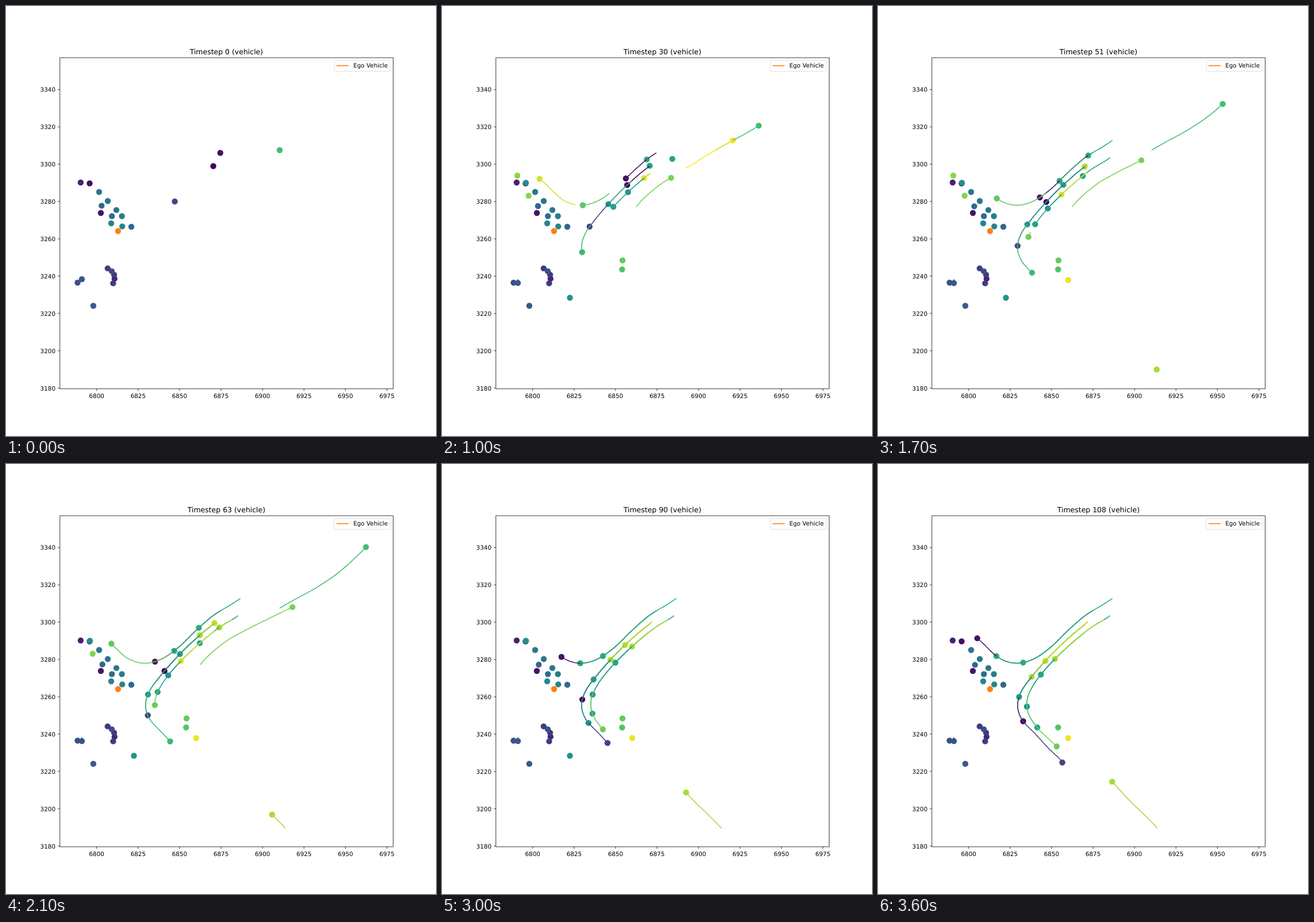
Recreate the animation shown at these times as an HTML page with a canvas. Size 748x748 px, loop 3700 ms.

```html
<!DOCTYPE html>
<html>
<head>
<meta charset="utf-8">
<style>
html, body { margin: 0; width: 100%; height: 100%; overflow: hidden; background: #fff; }
canvas { display: block; }
</style>
</head>
<body>
<canvas id="plot" width="748" height="748"></canvas>
<script>
const g = document.getElementById('plot').getContext('2d');
const STEP = 100, COUNT = 37, LAST = COUNT - 1;
const ORANGE = '#ff7f0e', FONT = '"DejaVu Sans", Verdana, sans-serif';
const L = 93.8, R = 673.5, T = 90, B = 665.9;
const mix = (a, b, f) => a + (b - a) * f;

// Viridis colour map
const stops = ['440154', '482475', '414487', '355f8d', '2a788e', '21918c',
  '22a884', '44bf70', '7ad151', 'bddf26', 'fde725']
  .map(h => [0, 2, 4].map(i => parseInt(h.slice(i, i + 2), 16)));

function shade(v) {
  const i = Math.min(9, Math.floor(v * 10));
  return `rgb(${stops[i].map((c, j) => Math.round(mix(c, stops[i + 1][j], v * 10 - i)))})`;
}

// A lane is a smooth curve over evenly spaced values of x (or of y when upright)
function lane(from, gap, upright, ...knots) {
  const knot = i => knots[Math.max(0, Math.min(knots.length - 1, i))];
  return q => {
    const i = Math.floor((q - from) / gap), u = (q - from) / gap - i, w = 1 - u;
    const a = knot(i), b = knot(i + 1);
    const p = a * w * w * (1 + 2 * u) + b * u * u * (3 - 2 * u) +
      u * w * (w * (b - knot(i - 1)) - u * (knot(i + 2) - a)) / 2;
    return upright ? [p, q] : [q, p];
  };
}

const west = lane(120, 30, false, 256, 284, 309.5, 337, 346.5, 339.5, 319, 290, 264, 245.5, 228);
const outer = lane(270, 25, true, 368, 340.3, 313, 289, 267.5, 249.7, 242.8, 250.8, 274, 297, 321);
const inner = lane(260, 25, true, 407, 370, 339, 312, 288.5, 270, 259.5, 262, 278.5, 304, 329);
const east = lane(420, 40, false, 283, 260, 237, 215, 187.5, 151, 110);
const merge = lane(295, 40, false, 420, 353, 314, 290, 270, 250.5, 232);
const side = lane(400, 20, false, 547, 566.5, 588, 607, 627, 647);

const cars = [];

function add(v, start, end, at, moves) {
  cars.push({ v, start, end, at, moves, color: shade(v) });
}
function park(v, x, y, start = 0, end = LAST) {
  add(v, start, end, () => [x, y], false);
}
function row(n, x, y, dx, dy, v, dv = 0) {
  for (let i = 0; i < n; i++) park(v + dv * i, x + dx * i, y + dy * i);
}
// Enters a lane at q and goes on with a speed and a steady gain
function drive(v, road, start, q, speed, gain, end = LAST) {
  add(v, start, end, k => road(q + speed * (k - start) + gain * (k - start) ** 2), true);
}

// Parking rows
row(3, 162, 323.5, 15, 15.7, .39);
row(2, 201.6, 365.5, 16.4, 18.5, .42, -.09);
row(2, 184.2, 365.5, 18, 17.9, .35, .1);
row(2, 165, 360, 18, 18, .05, .4);
row(2, 129.9, 307, 15.6, 1.5, .09, -.05);
for (let t = -2; t <= 2; t++)
  park(.17 - .07 * Math.sin(t * Math.PI / 2), 188 + 2.4 * t - 1.6 * t * t, 467.4 + 6.5 * t + .5 * t * t);
park(.24, 124.5, 481.3);
park(.28, 151.9, 521.5);

// Creeping
add(.33, 0, LAST, k => [166.3 + k / 15, 347.4 + k / 18], false);
add(.27, 0, LAST, k => [132, 482 - 6.7 * Math.exp(-k / 3)], true);

// Parked for a while
park(.83, 131, 295, 3, 17);
park(.82, 150.7, 330, 3, 23);
park(.5, 146, 307.5, 2, 33);
park(.51, 222.5, 507.5, 2, 33);
park(.76, 314, 442.5, 9, 33);
park(.72, 313.3, 458.2, 8);
park(.97, 330.9, 476.7, 17);

// Through traffic
drive(.05, west, 0, 372.8, -5.2, -.01);
drive(.75, west, .5, 291.5, -4.6, -.033, 23);
drive(.94, west, 2.5, 232.5, -9.2, .11, 16);
drive(.62, west, 9.6, 358.5, -5.78, 0);
drive(.63, west, 12, 408, -9, .105);

drive(.01, outer, 0, 278.5, 2.75, .054);
drive(.2, outer, 0, 340, 4.15, .023);
drive(.68, outer, 1.5, 380, 6, -.038, 23);
drive(.53, outer, 1.5, 304.5, 4.55, .02, 33);
drive(.57, outer, 9.5, 275.5, 4.7, .007);
drive(.88, outer, 16, 275, 4.5, .013);
drive(.91, outer, 20.3, 273.8, 4, .025);

drive(.5, inner, 2.5, 292, 4.35, -.014);
drive(.58, inner, 4, 322.5, 4.5, -.008);
drive(.96, inner, 8, 290.5, 4.5, -.036, 23);
drive(.59, inner, 9.5, 263.7, 4.4, -.02);
drive(.78, inner, 15, 393, 4.3, .018);
drive(.87, inner, 17.5, 271, 3.8, -.006);

drive(.69, east, 0, 476, 7.8, -.031, 24);
drive(.99, east, .4, 424, 8.7, -.018, 16);
drive(.8, merge, .4, 338, 5, .135, 23);
drive(.87, side, 16.8, 486, -5.9, .094);

cars.sort((a, b) => a.v - b.v);

function dot([x, y], color) {
  g.fillStyle = color;
  g.beginPath();
  g.arc(x, y, 5.2, 0, 7);
  g.fill();
}

function line(points, color, width) {
  g.strokeStyle = color;
  g.lineWidth = width;
  g.beginPath();
  points.forEach(p => g.lineTo(...p));
  g.stroke();
}

function label(text, x, y, align, size = 10.39) {
  g.font = `${size}px ${FONT}`;
  g.textAlign = align;
  g.fillStyle = '#000';
  g.fillText(text, x, y);
}

function trail(car, k) {
  const points = [];
  for (let s = car.start; s < k; s += .25) points.push(car.at(s));
  line([...points, car.at(k)], car.color, 1.56);
}

function axes(k) {
  g.strokeStyle = '#000';
  g.lineWidth = .78;
  g.strokeRect(L, T, R - L, B - T);
  for (let i = 0; i < 8; i++) {
    const x = 157.7 + 72.13 * i;
    line([[x, B], [x, B + 3.64]], '#000', .78);
    label(6800 + 25 * i, x, 681.8, 'center');
  }
  for (let i = 0; i < 9; i++) {
    const y = 664.7 - 64.92 * i;
    line([[L, y], [L - 3.64, y]], '#000', .78);
    label(3180 + 20 * i, 86, y + 3.9, 'right');
  }
  label(`Timestep ${3 * k} (vehicle)`, 383.4, 83.5, 'center', 12.47);
}

function legend() {
  g.beginPath();
  g.roundRect(571, 95, 97, 18.6, 2);
  g.fillStyle = 'rgba(255,255,255,.8)';
  g.fill();
  g.strokeStyle = 'rgba(204,204,204,.8)';
  g.lineWidth = .78;
  g.stroke();
  line([[575, 103.8], [595.8, 103.8]], ORANGE, 1.56);
  label('Ego Vehicle', 604.2, 107.4, 'left');
}

function draw(now) {
  const k = Math.floor(now / STEP) % COUNT;
  g.textRendering = 'geometricPrecision';
  g.fillStyle = '#fff';
  g.fillRect(0, 0, 748, 748);
  const active = cars.filter(c => k >= c.start && k <= c.end);
  active.forEach(c => dot(c.at(k), c.color));
  dot([194.9, 391.5], ORANGE);
  active.filter(c => c.moves).forEach(c => trail(c, k));
  axes(k);
  legend();
}

const begin = performance.now();
function tick() {
  draw(performance.now() - begin);
  requestAnimationFrame(tick);
}
tick();
</script>
</body>
</html>
```
